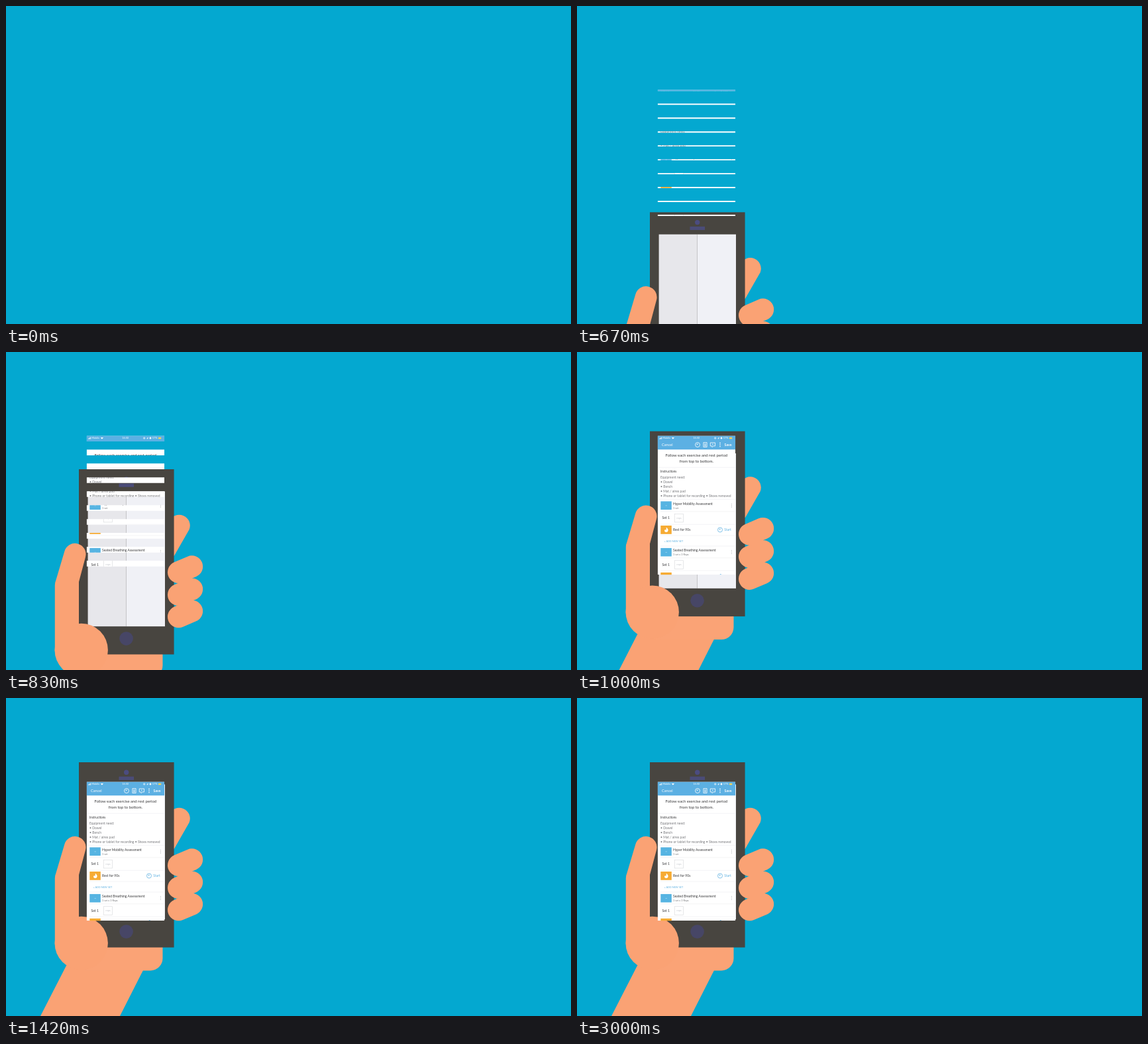
Write an HTML page that moves like this. It is 853 px wide and 480 px high and loops after 4.01 s.

```html
<!DOCTYPE html>
<html lang="en">
<head>
<meta charset="utf-8">
<title>Phone in hand</title>
<style>
  html, body { margin: 0; width: 100%; height: 100%; overflow: hidden; background: #04a8d0; }
  svg { display: block; width: 100%; height: 100%; }
  text { font-family: Lato, "Open Sans", sans-serif; font-size: 5px; fill: #3a3a3c; }
  .title { font-size: 5.9px; text-anchor: middle; }
  .note { fill: #77787c; }
  .small { font-size: 3.9px; fill: #77787c; }
  .hint { font-size: 3.9px; fill: #c4c6cb; text-anchor: middle; }
  .link { fill: #62b3e2; }
  .bar { fill: #fff; }
  .tiny { font-size: 3.8px; }
  .line { fill: none; stroke-width: .8; }
  .skin { fill: #faa274; }
  .finger { fill: none; stroke: #faa274; stroke-width: 33; stroke-linecap: round; }
</style>
</head>
<body>
<svg viewBox="0 0 853 480" preserveAspectRatio="xMinYMin meet">
  <defs>
    <clipPath id="blinds"></clipPath>
    <g id="clock" class="line">
      <circle r="3.5"/>
      <path d="M0 0V-2M0 0L-1.6 -1"/>
    </g>
    <g id="menu" fill="#a9abb0">
      <circle cy="-2.3" r=".55"/><circle r=".55"/><circle cy="2.3" r=".55"/>
    </g>
    <g id="setRow">
      <text x="128.5" y="1.8">Set 1</text>
      <rect x="147.5" y="-6.3" width="13" height="12.6" fill="#fff" stroke="#dcdde0" stroke-width=".7"/>
      <text class="hint" x="154" y="1.4">reps</text>
    </g>
    <g id="thumb">
      <rect x="126.3" y="-6.3" width="16.5" height="12.6" fill="#56b4e2"/>
      <path d="M133.5 .2h2.4" stroke="#a5d8f0" stroke-width=".8"/>
    </g>
  </defs>

  <rect width="853" height="480" fill="#04a8d0"/>

  <g id="hand">
    <path class="skin" d="M254 227.5L276.6 188A16.2 16.2 0 1 0 246.5 176L230 227.5Z"/>
    <path class="skin" d="M91 404L0 581.5H120.5L207 411L150 370Z"/>
    <path fill="#faa376" d="M110 360H236.5V393A18.5 18.5 0 0 1 218 411.5H120Z"/>
    <rect x="110" y="97" width="143.6" height="279.5" fill="#484540"/>
    <circle cx="181.7" cy="112.3" r="3.7" fill="#4b4c80"/>
    <rect x="170.5" y="118.6" width="22.5" height="5.2" fill="#4b4c78"/>
    <circle cx="181.6" cy="352.6" r="10.3" fill="#474666"/>
    <rect x="123.6" y="130.4" width="58" height="203.8" fill="#e7e7eb"/>
    <rect x="181.6" y="130.4" width="58.4" height="203.8" fill="#f0f1f6"/>
    <path class="skin" d="M73.8 372V272Q73.8 268 75.5 264L88.3 221A16.2 16.2 0 0 1 120 229.5L110 267V372Z"/>
    <circle class="skin" cx="113.7" cy="370" r="40.2"/>
    <path class="finger" d="M260.5 252.5L280.7 243.8M260.5 286.5L280.7 278M260.5 319.8L280.7 311.2"/>
  </g>

  <g clip-path="url(#blinds)">
    <rect x="121.7" y="126.4" width="117.5" height="209.6" fill="#fff"/>
    <rect x="121.7" y="126.4" width="117.5" height="20.8" fill="#5cb0e3"/>

    <!-- status bar -->
    <path d="M124.5 131.5v-1M125.6 131.5v-1.6M126.7 131.5v-2.3M127.8 131.5v-3" stroke="#fff" stroke-width=".8"/>
    <text class="bar tiny" x="129.6" y="131.3">Mobile</text>
    <path d="M142.7 129l2.2 2.6 2.2-2.6Z" fill="#fff"/>
    <text class="bar tiny" x="180.2" y="131.3" text-anchor="middle">16:50</text>
    <circle class="line" cx="208.7" cy="130" r="1.1" stroke="#fff"/>
    <path d="M212 130.2l3-1.4-1.3 3-.4-1.3Z" fill="#fff"/>
    <circle cx="218" cy="130" r="1.4" fill="#fff"/>
    <text class="bar tiny" x="221" y="131.3">57%</text>
    <rect x="230" y="128.8" width="4.2" height="2.4" fill="#f5d35a"/>

    <!-- toolbar -->
    <text class="bar" style="font-size:5.6px" x="128" y="142">Cancel</text>
    <use href="#clock" x="182" y="140" stroke="#fff"/>
    <g class="line" stroke="#fff">
      <path d="M190.9 136.6h5.2v6.8h-5.2ZM192.2 138.8h2.6M192.2 140.3h2.6M192.2 141.8h2.6"/>
      <path d="M201.3 136.9h7.2v5h-2.8l-1.5 1.7-.6-1.7h-2.3ZM204.9 138.2v2.4"/>
    </g>
    <g fill="#fff">
      <circle cx="216" cy="137.4" r=".8"/><circle cx="216" cy="140" r=".8"/><circle cx="216" cy="142.6" r=".8"/>
    </g>
    <text class="bar" style="font-size:5.3px;font-weight:bold" x="222.6" y="142">Save</text>

    <!-- notes -->
    <text class="title" x="180.3" y="158.4">Follow each exercise and rest period</text>
    <text class="title" x="180.3" y="166.8">from top to bottom.</text>
    <path d="M122 174.3h117M122 222.3h117M126 240.8h113M126 260.3h113M126 277h113M126 293h113M126 310.8h113M126 330h113" stroke="#f0f0f2" stroke-width=".7"/>
    <text style="font-size:4.7px" x="126" y="181.6">Instructions</text>
    <g id="notes"></g>

    <!-- exercises -->
    <use href="#thumb" y="231.7"/>
    <text x="145" y="231.2">Hyper Mobility Assessment</text>
    <text class="small" x="145" y="237.2">1 set</text>
    <use href="#menu" x="233.4" y="231.6"/>
    <use href="#setRow" y="250.6"/>

    <rect x="126.3" y="262" width="16.5" height="12.8" fill="#f6ab33"/>
    <path d="M134.8 264.6q3.4 3 2.7 5.3a2.8 2.6 0 0 1-5.5 0q.1-1.5 1.3-2.2.2 1 .9 1.2.9-2 .6-4.3Z" fill="#fff"/>
    <text x="145" y="270.4">Rest for 90s</text>
    <use href="#clock" x="216" y="268.4" stroke="#62b3e2"/>
    <text class="link" x="222.3" y="270.3">Start</text>
    <text class="link" style="font-size:3.8px" x="131.4" y="286.6">+ ADD NEW SET</text>

    <use href="#thumb" y="302.2"/>
    <text x="145" y="301.4">Seated Breathing Assessment</text>
    <text class="small" x="145" y="307.4">1 set x 3 Reps</text>
    <use href="#menu" x="233.4" y="301.8"/>
    <use href="#setRow" y="321"/>
    <rect x="126.3" y="332.8" width="16.5" height="4" fill="#f6ab33"/>
    <path d="M215.8 335.6h2" stroke="#62b3e2" stroke-width=".8"/>
  </g>
</svg>
<script>
  const LOOP = 4010, STEP = 1000 / 12;
  const SLATS = 10, TOP = 126.4, PITCH = 20.96;
  const SVG = "http://www.w3.org/2000/svg";
  const hand = document.getElementById("hand");

  function add(parent, tag, attrs, text = "") {
    const el = document.createElementNS(SVG, tag);
    for (const key in attrs) el.setAttribute(key, attrs[key]);
    el.textContent = text;
    document.getElementById(parent).appendChild(el);
    return el;
  }

  ["Equipment need:", "• Dowel", "• Bench", "• Mat / airex pad",
   "• Phone or tablet for recording • Shoes removed"]
    .forEach((s, i) => add("notes", "text", { class: "note", x: 126, y: 190.8 + 7 * i }, s));

  const slats = Array.from({ length: SLATS }, (_, i) =>
    add("blinds", "rect", { x: 121.7, y: TOP + PITCH * i, width: 117.5, height: 0 }));

  const clamp = v => Math.min(1, Math.max(0, v));

  // The hand rises and slows down; it comes to rest at 1514 ms.
  const drop = t => Math.pow(Math.max(0, 1514 - t) * 0.00389, 4.5);

  // The slats of the screen open faster and faster from 500 to 1000 ms.
  const open = t => Math.pow(clamp((t - 500) / 500), 2.2);

  function draw(ms) {
    const t = Math.floor((ms % LOOP + 5) / STEP) * STEP;
    hand.setAttribute("transform", `translate(0 ${drop(t).toFixed(2)})`);
    const k = open(t);
    // a slight overlap hides the seams once the slats meet
    const h = k < 1 ? k * PITCH : PITCH + 0.3;
    for (const slat of slats) slat.setAttribute("height", h.toFixed(2));
  }

  const start = performance.now();
  function tick() {
    draw(performance.now() - start);
    requestAnimationFrame(tick);
  }
  tick();
</script>
</body>
</html>
```
